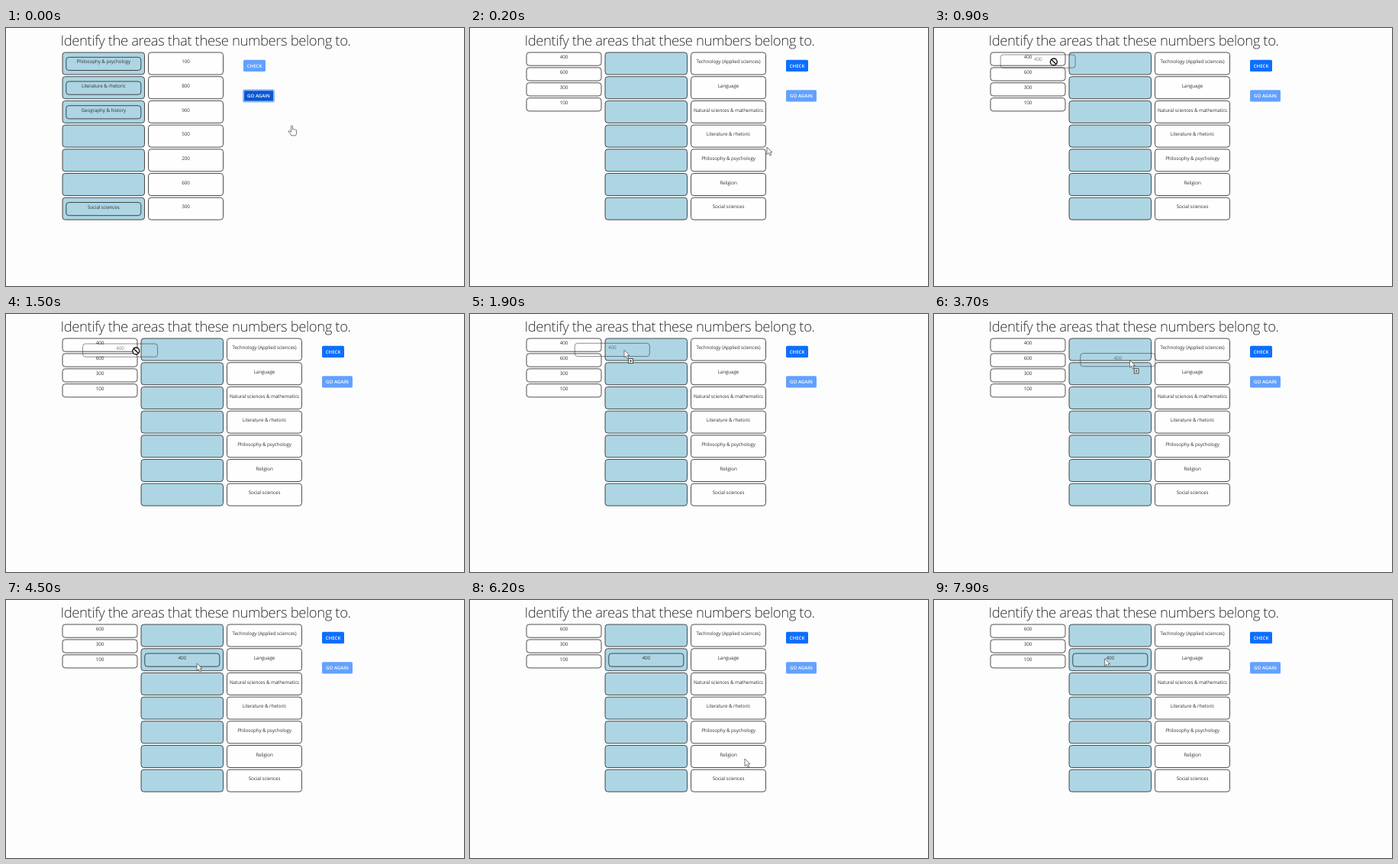
These frames come from a looping animation (600 by 338 pixels, 8000 ms). An HTML page:

```html
<!DOCTYPE html>
<html lang="en">
<head>
<meta charset="utf-8">
<title>Matching quiz</title>
<style>
  html, body { margin: 0; width: 100%; height: 100%; overflow: hidden; background: #fefdfe; }
  svg { display: block; width: 100vw; height: 100vh; }
  text { font: 6.3px "Open Sans", "Noto Sans", sans-serif; letter-spacing: -.1px; fill: #333; text-anchor: middle; text-rendering: geometricPrecision; }
  .title { font-size: 18.5px; font-weight: 300; letter-spacing: -.41px; fill: #2b2f33; text-anchor: start; }
  .box { fill: #fefefe; stroke: #222; stroke-width: .8; }
  .slot { fill: #add5e3; }
  .clear { fill: none; }
  .button text { font-size: 6.1px; font-weight: 600; letter-spacing: 0; fill: #fff; }
  .button rect { fill: #0d6efd; }
  .button.off rect { fill: #62a1fe; }
  .button.focus rect { fill: #0b57cf; stroke: #8fbcfb; stroke-width: 2; }
  #ghost { opacity: .62; }
  .pointer { fill: #fff; stroke: #555; stroke-width: .8; stroke-linejoin: round; }
</style>
</head>
<body>
<svg viewBox="0 0 600 338">
  <text class="title" x="71.5" y="23">Identify the areas that these numbers belong to.</text>
  <g id="solved"></g>
  <g id="quiz"></g>
  <g id="before"></g>
  <g id="after"></g>
  <g id="ghost"></g>
  <g id="cursor">
    <path id="hand" class="pointer" d="M-1 7V.8Q0-.6 1 .8V5Q2.2 4.2 3 5.4Q4.2 4.8 4.8 6Q6.2 5.6 6.2 7V9.5Q6 12 4.8 13.3H-.6Q-2 11-4.4 8.4Q-4.6 6.6-3 7.2L-1 8.8Z"/>
    <path id="arrow" class="pointer" d="M0 0V9.6L2.3 7.6L4 11.2L5.7 10.4L4.1 6.9H7Z"/>
    <g id="plus" fill="#fff" stroke="#222" stroke-width=".8">
      <rect x="5.7" y="11.3" width="5.8" height="6"/>
      <path d="M8.6 12.7V15.9M7 14.3H10.2"/>
    </g>
    <g id="forbidden" fill="#fff" stroke="#111" stroke-width="1.4">
      <circle cx="5" cy=".4" r="4.4"/>
      <path d="M1.9-2.7L8.1 3.5"/>
    </g>
  </g>
</svg>
<script>
const SVG = 'http://www.w3.org/2000/svg';
const byId = id => document.getElementById(id);
const DURATION = 8000, STEP = 100;
const TOP = 32, ROW = 31.7, ITEM = 19.9;
const LEFT = 74, SLOT_X = 177, ANSWER_X = 289.5, CARD_W = 98;
const SOLVED_SHIFT = -103;
const GRAB = [138.7, 41], GRABBED_AT = 800, DROPPED_AT = 4200, QUIZ_AT = 100;

function add(parent, tag, attrs, content) {
  const node = document.createElementNS(SVG, tag);
  for (const name in attrs) node.setAttribute(name, attrs[name]);
  if (content) node.textContent = content;
  return parent.appendChild(node);
}

function card(parent, x, y, height, label, textY, kind = '') {
  add(parent, 'rect', { class: 'box ' + kind, x, y, width: CARD_W, height, rx: 3.6 });
  add(parent, 'text', { x: x + CARD_W / 2, y: y + textY }, label);
}

const item = (parent, x, y, label, kind) => card(parent, x, y, 17.2, label, 8.1, kind);
const placed = (parent, row, label) => item(parent, SLOT_X + 4.8, TOP + row * ROW + 6.3, label, 'clear');

function button(parent, y, width, label, state) {
  const group = add(parent, 'g', { class: 'button ' + state });
  add(group, 'rect', { x: 414, y, width, height: 15.3, rx: 1.6 });
  add(group, 'text', { x: 414 + width / 2, y: y + 9.8 }, label);
}

function board(parent, answers, checkState, againState) {
  answers.forEach((label, row) => {
    const y = TOP + row * ROW;
    add(parent, 'rect', { class: 'box slot', x: SLOT_X, y, width: 107.5, height: 29, rx: 3.6 });
    card(parent, ANSWER_X, y, 29, label, 14.2);
  });
  button(parent, 41.8, 29, 'CHECK', checkState);
  button(parent, 81.2, 40, 'GO AGAIN', againState);
}

function pile(parent, labels) {
  labels.forEach((label, i) => item(parent, LEFT, TOP + i * ITEM, label));
}

const solved = byId('solved');
solved.setAttribute('transform', `translate(${SOLVED_SHIFT} 0)`);
board(solved, ['100', '800', '900', '500', '200', '600', '300'], 'off', 'focus');
['Philosophy & psychology', 'Literature & rhetoric', 'Geography & history', '', '', '', 'Social sciences']
  .forEach((label, row) => label && placed(solved, row, label));

board(byId('quiz'), ['Technology (Applied sciences)', 'Language', 'Natural sciences & mathematics',
  'Literature & rhetoric', 'Philosophy & psychology', 'Religion', 'Social sciences'], '', 'off');
pile(byId('before'), ['400', '600', '300', '100']);
pile(byId('after'), ['600', '300', '100']);
placed(byId('after'), 1, '400');
item(byId('ghost'), LEFT, TOP, '400', 'clear');

// Pointer tip: time, x, y
const path = [
  [0, 374.5, 127.6], [99, 374.5, 127.6], [100, 386, 150], [200, 389, 156], [300, 376, 138],
  [600, 200, 62], [800, 138.7, 41], [1000, 165, 47], [1500, 165.3, 48], [1800, 190, 47],
  [2300, 250, 48.5], [2600, 257.5, 49], [2700, 257.5, 49], [3200, 256.5, 60.5],
  [3700, 256.5, 60.5], [4200, 251, 79], [4500, 250, 83], [5900, 250, 83],
  [6200, 360, 208], [7700, 360, 208], [7800, 296, 146], [7900, 223.7, 76.8], [8000, 223.7, 76.8]
];

function tipAt(time) {
  const i = path.findIndex(key => key[0] > time);
  const [t0, x0, y0] = path[i - 1], [t1, x1, y1] = path[i];
  const p = (time - t0) / (t1 - t0);
  return [x0 + (x1 - x0) * p, y0 + (y1 - y0) * p];
}

const show = (id, on) => { byId(id).style.display = on ? '' : 'none'; };
const move = (id, x, y) => byId(id).setAttribute('transform', `translate(${x} ${y})`);

function draw(now) {
  const time = Math.floor(now % DURATION / STEP) * STEP;
  const [x, y] = tipAt(time);
  const quiz = time >= QUIZ_AT, dropped = time >= DROPPED_AT;
  const dragging = time > GRABBED_AT && !dropped;
  const overSlot = x >= SLOT_X;
  show('solved', !quiz);
  show('quiz', quiz);
  show('before', quiz && !dropped);
  show('after', dropped);
  show('ghost', dragging);
  show('hand', !quiz);
  show('arrow', quiz && (!dragging || overSlot));
  show('plus', dragging && overSlot);
  show('forbidden', dragging && !overSlot);
  move('cursor', x, y);
  move('ghost', x - GRAB[0], y - GRAB[1]);
}

const start = performance.now();
function tick() {
  draw(performance.now() - start);
  requestAnimationFrame(tick);
}
tick();
</script>
</body>
</html>
```
